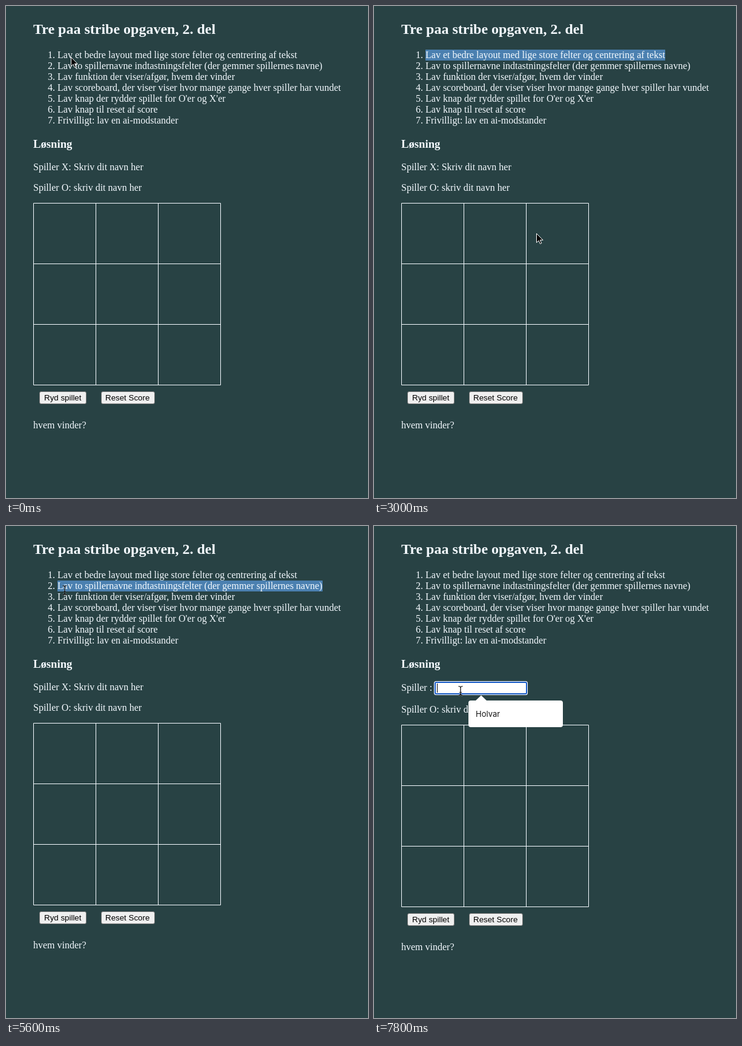
An HTML page that plays this animation: 598 px wide and 812 px high, repeating every 8 s.

```html
<!DOCTYPE html>
<html lang="da">
<head>
<meta charset="utf-8">
<title>Tre paa stribe</title>
<style>
html, body { margin: 0; width: 100%; height: 100%; overflow: hidden; background: #284244; }
svg { display: block; width: 598px; height: 812px; font: 16px "Liberation Serif", serif; fill: #f4faff; }
text { white-space: pre; }
.title { font-size: 24px; font-weight: bold; }
.subtitle { font-size: 18.72px; font-weight: bold; }
.grid { fill: none; stroke: #f4faff; }
.button rect { fill: #efefef; stroke: #767676; }
.button text { font: 13.333px "Liberation Sans", sans-serif; fill: #000; }
.popup text { font: 13px Inter, sans-serif; fill: #161616; }

.selection, .cursor, .arrow, .beam, .ring, .prompt, .field, .below, .focus {
  animation: 8s step-end infinite;
}
.selection { fill: #4b80b0; animation-name: select; }
.cursor { animation-name: move; }
.arrow { animation-name: arrow; }
.beam { animation-name: beam; }
.ring { animation-name: press; }
.prompt { animation-name: prompt; }
.field { animation-name: field; }
.below { animation-name: shift; }
.focus { animation-name: focus; }

@keyframes select {
  0% { opacity: 0; y: 72px; width: 23px; }
  7.5% { opacity: 1; y: 72px; width: 23px; }
  10% { opacity: 1; y: 72px; width: 396px; }
  67.5% { opacity: 1; y: 90px; width: 23px; }
  70% { opacity: 1; y: 90px; width: 438px; }
  85%, 100% { opacity: 0; y: 90px; width: 438px; }
}
@keyframes move {
  0% { transform: translate(107px, 84px); }
  2.5% { transform: translate(104px, 86px); }
  17.5% { transform: translate(104px, 86px); animation-timing-function: steps(4); }
  27.5% { transform: translate(130px, 372px); animation-timing-function: steps(4); }
  37.5% { transform: translate(268px, 375px); }
  42.5% { transform: translate(268px, 375px); animation-timing-function: steps(5); }
  55% { transform: translate(36px, 150px); animation-timing-function: steps(2); }
  60% { transform: translate(97px, 106px); }
  70% { transform: translate(97px, 106px); animation-timing-function: steps(3); }
  77.5% { transform: translate(108px, 192px); animation-timing-function: steps(2); }
  82.5% { transform: translate(121px, 265px); }
  87.5% { transform: translate(121px, 265px); animation-timing-function: steps(2); }
  92.5%, 100% { transform: translate(143px, 272px); }
}
@keyframes arrow {
  0%, 20% { opacity: 1; }
  2.5% { opacity: 0; }
  60%, 100% { opacity: 0; }
}
@keyframes beam {
  0%, 20% { opacity: 0; }
  2.5% { opacity: 1; }
  60%, 100% { opacity: 1; }
}
@keyframes press {
  0%, 10%, 70%, 85%, 95%, 100% { opacity: 0; }
  5%, 65%, 82.5%, 92.5% { opacity: 1; }
}
@keyframes prompt { 0% { opacity: 1; } 85%, 100% { opacity: 0; } }
@keyframes field { 0% { opacity: 0; } 85%, 100% { opacity: 1; } }
@keyframes shift { 0% { transform: none; } 85%, 100% { transform: translateY(3px); } }
@keyframes focus { 0% { opacity: 0; } 95%, 100% { opacity: 1; } }
</style>
</head>
<body>
<svg viewBox="0 0 598 812">
  <rect class="selection" x="85" y="72" width="23" height="18"/>
  <text class="title" x="45" y="46">Tre paa stribe opgaven, 2. del</text>
  <text x="69" y="86">1. Lav et bedre layout med lige store felter og centrering af tekst</text>
  <text x="69" y="104">2. Lav to spillernavne indtastningsfelter (der gemmer spillernes navne)</text>
  <text x="69" y="122">3. Lav funktion der viser/afgør, hvem der vinder</text>
  <text x="69" y="140">4. Lav scoreboard, der viser viser hvor mange gange hver spiller har vundet</text>
  <text x="69" y="158">5. Lav knap der rydder spillet for O'er og X'er</text>
  <text x="69" y="176">6. Lav knap til reset af score</text>
  <text x="69" y="194">7. Frivilligt: lav en ai-modstander</text>
  <text class="subtitle" x="45" y="234">Løsning</text>

  <text class="prompt" x="45" y="271">Spiller X: Skriv dit navn her</text>
  <g class="field">
    <text x="45" y="272">Spiller : </text>
    <rect x="101" y="258" width="151" height="19" fill="#fff"/>
  </g>

  <g class="below">
    <text x="45" y="305">Spiller O: skriv dit navn her</text>
    <path class="grid" d="M45.5 325.5h309v300h-309zM148.5 325.5v300M251.5 325.5v300M45.5 425.5h309M45.5 525.5h309"/>
    <g class="button">
      <rect x="55.5" y="636.5" width="77" height="20" rx="2.5"/>
      <text x="63" y="651">Ryd spillet</text>
      <rect x="157.5" y="636.5" width="88" height="20" rx="2.5"/>
      <text x="164" y="651">Reset Score</text>
    </g>
    <text x="45" y="697">hvem vinder?</text>
  </g>

  <g class="focus">
    <rect x="99" y="256" width="155" height="23" rx="3.5" fill="#fff"/>
    <rect x="101" y="258" width="151" height="19" rx="2" fill="#fff" stroke="#1659c4" stroke-width="2"/>
    <path d="M104.5 260v15" stroke="#000"/>
    <g class="popup">
      <path d="M167 289l10-9.500 10 9.500z" fill="#fff"/>
      <rect x="156" y="288" width="156" height="44" rx="4" fill="#fff"/>
      <text x="168" y="315">Holvar</text>
    </g>
  </g>

  <g class="cursor">
    <g class="ring" fill="none">
      <circle r="14" fill="#284244" fill-opacity=".5" stroke="#000" stroke-width="7"/>
      <circle r="14.500" stroke="#fff" stroke-width="2.500"/>
    </g>
    <path class="arrow" d="M.5 .5v15l3.500-3.300 2.400 5.300 2.400-1-2.400-5.200h4.700z" fill="#000" stroke="#fff"/>
    <g class="beam" fill="none">
      <path id="beam" d="M-3.500-7.500q3.500 0 3.500 2.500V5q0 2.500-3.500 2.500M3.500-7.500Q0-7.500 0-5M0 5q0 2.500 3.500 2.500M-2 2.500h4" stroke="#fff" stroke-opacity=".35" stroke-width="2.400"/>
      <path d="M-3.500-7.500q3.500 0 3.500 2.500V5q0 2.500-3.500 2.500M3.500-7.500Q0-7.500 0-5M0 5q0 2.500 3.500 2.500M-2 2.500h4" stroke="#000" stroke-width="1.200"/>
    </g>
  </g>
</svg>
</body>
</html>
```
